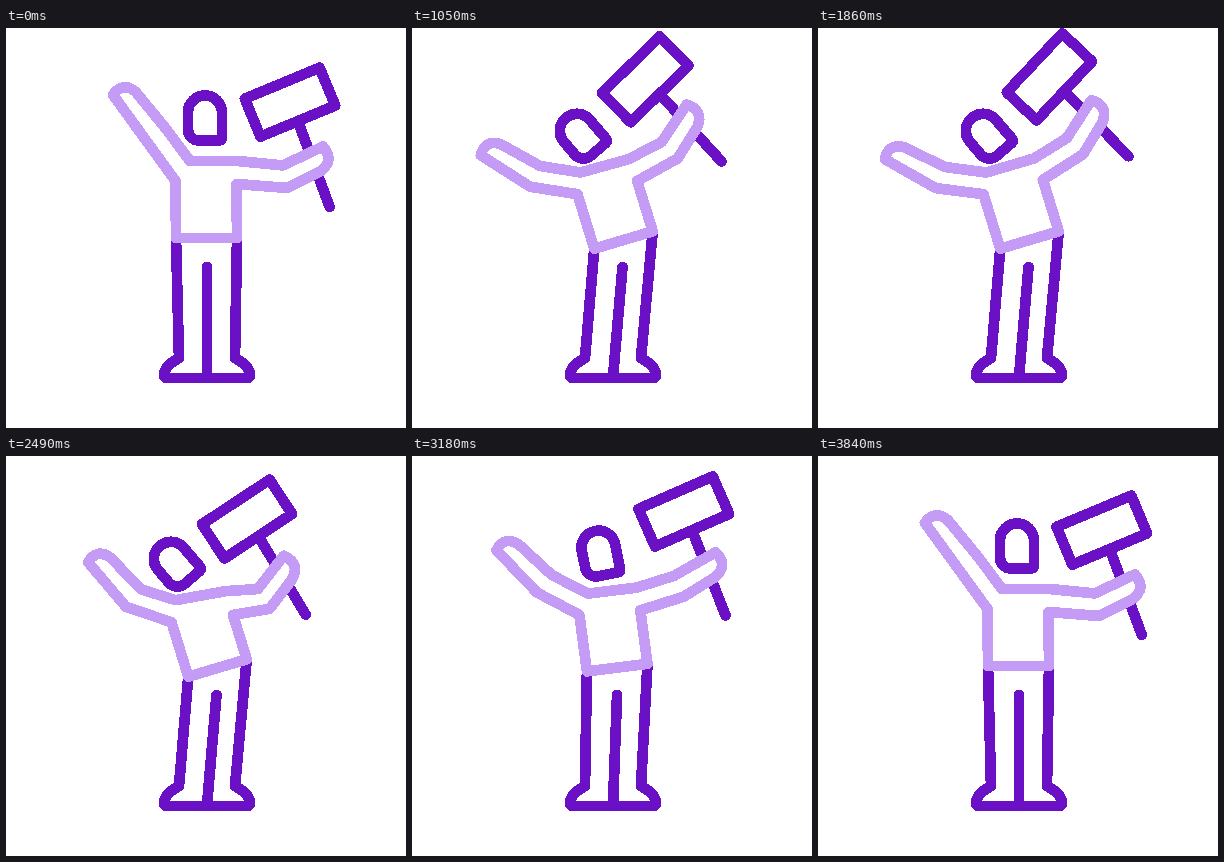
Recreate the animation shown at these times as an HTML page. Size 400 by 400 pixels, loop 4.83 s.

```html
<!DOCTYPE html>
<html lang="en">
<head>
<meta charset="utf-8">
<title>Protester waving a sign</title>
<style>
  html, body { margin: 0; width: 100%; height: 100%; overflow: hidden; background: #fff; }
  svg { display: block; width: 100%; height: 100%; shape-rendering: crispEdges; }
  path { fill: none; stroke-width: 10.7; stroke-linecap: round; stroke-linejoin: round; }
  .dark { stroke: #6a11c6; }
  .light { stroke: #c59cf5; fill: #fff; }
</style>
</head>
<body>
<svg viewBox="0 0 400 400">
  <path id="legs" class="dark"/>
  <g id="sign">
    <path class="dark" d="M0 20.5L-3.5 112M-40.5 -20.5H40.5V20.5H-40.5Z"/>
  </g>
  <path id="shirt" class="light"/>
  <g id="head">
    <path class="dark" d="M-17 -5.5A17 17 0 0 1 17 -5.5V19.5Q17 22.5 14 22.5H-6A11 11 0 0 1 -17 11.5Z"/>
  </g>
</svg>
<script>
const LOOP = 4830, STEP = 30, LEAD = 15, SWING_END = 3840;
// The arms swing out, up, down and up again; then all of it runs backwards.
const OUT = 300, UP = 935, DOWN = 1440, TURN = SWING_END / 2;
const LEAN_PAUSE = 500, LEAN_END = 960, LEAN_ANGLE = -16.6;

const mix = (a, b, u) => a + (b - a) * u;

function ease(t, from, to) {
  const u = Math.min(1, Math.max(0, (t - from) / (to - from)));
  return (1 - Math.cos(Math.PI * u)) / 2;
}

function swing(t, rest, out, up, down) {
  if (t < OUT) return mix(rest, out, ease(t, 0, OUT));
  if (t < UP) return mix(out, up, ease(t, OUT, UP));
  return mix(up, down, ease(t, UP, DOWN) - ease(t, DOWN, TURN));
}

function polar([x, y], length, degrees) {
  const a = degrees * Math.PI / 180;
  return [x + length * Math.cos(a), y + length * Math.sin(a)];
}

// Moves from a point by an offset given in a rotated frame.
const offset = (origin, dx, dy, degrees) =>
  polar(polar(origin, dx, degrees), dy, degrees + 90);

const middle = (a, b) => [mix(a[0], b[0], 0.5), mix(a[1], b[1], 0.5)];

// Rounded hand edge, bulging to the left of the direction a -> b.
function handCurve(a, b) {
  const [x, y] = middle(a, b);
  return `Q${x + (b[1] - a[1]) * 0.54} ${y - (b[0] - a[0]) * 0.54} ${b}`;
}

function leftArm(t, armpit) {
  const upper = swing(t, 54, 55, 7, 20);
  const fore = swing(t, 54, 69, 29, 52);
  const elbowOut = polar(armpit, 48, 180 + upper);
  const tip = polar(elbowOut, 58.5, 180 + fore);
  const inner = polar(tip, 23, fore - 61);
  const elbowIn = polar(elbowOut, 23, mix(upper, fore, 0.7) - 90);
  return { upper, path: `L${elbowOut}L${tip}${handCurve(tip, inner)}L${elbowIn}` };
}

function rightArm(t, armpit) {
  const upper = swing(t, 4.5, 3, -33, -7);
  const fore = swing(t, -27, 4, -59, -52);
  const elbowLow = polar(armpit, swing(t, 51, 42, 48, 36), upper);
  const low = polar(elbowLow, 37, fore);
  const tip = polar(low, 25, fore - 57);
  const elbowUp = polar(elbowLow, 23, mix(upper, fore, 0.5) - 90);
  return {
    upper,
    hand: middle(tip, low),
    path: `L${elbowUp}L${tip}${handCurve(tip, low)}L${elbowLow}`
  };
}

const el = id => document.getElementById(id);
const place = (id, [x, y], angle) =>
  el(id).setAttribute("transform", `translate(${x} ${y}) rotate(${angle})`);

function draw(time) {
  const stepped = Math.floor(time % LOOP / STEP) * STEP;
  const phase = Math.min(stepped + LEAD, SWING_END);
  const t = Math.min(phase, SWING_END - phase);

  const lean = 0.26 * ease(t, 0, LEAN_PAUSE) + 0.74 * ease(t, LEAN_PAUSE, LEAN_END);
  const settle = 1 - (1 - lean) ** 3;
  const tilt = LEAN_ANGLE * lean;
  const hip = [200.5 + 11 * lean, 210 + 2 * settle];
  const body = (x, y) => offset(hip, x, y, tilt);

  const hipL = body(-30.5, 0), hipR = body(30.5, 0);
  const armpitL = body(-31, -57);
  const drop = swing(t, 0, 0, 0, 8.5);
  const armpitR = body(30, -54 + drop);
  const left = leftArm(t, armpitL);
  const right = rightArm(t, armpitR);
  const neckL = body(-23 + left.upper * 0.12, -77);
  const neckR = body(31 + right.upper * 0.1, -77 + drop * 0.75);

  el("shirt").setAttribute("d",
    `M${hipL}L${armpitL}${left.path}L${neckL}L${neckR}${right.path}L${armpitR}L${hipR}Z`);
  el("legs").setAttribute("d",
    `M${hipL}L173 330C164 335 158 340 158 347Q158 350 161 350H241Q244 350 244 347` +
    `C244 340 238 335 229 330L${hipR}M${201 + 9.5 * lean} 239L201 349`);

  const nod = tilt - 24 * lean * lean;
  place("head", offset(body(-1.5, -96 + 5 * settle), 0, -24, nod), nod);

  const signAngle = swing(t, -22.7, 7, -47, -31.8);
  const grip = swing(t, 64.5, 66, 58, 63.5);
  place("sign", offset(right.hand, -7.5, -grip, signAngle), signAngle);
}

const start = performance.now();
function tick() {
  draw(performance.now() - start);
  requestAnimationFrame(tick);
}
tick();
</script>
</body>
</html>
```
